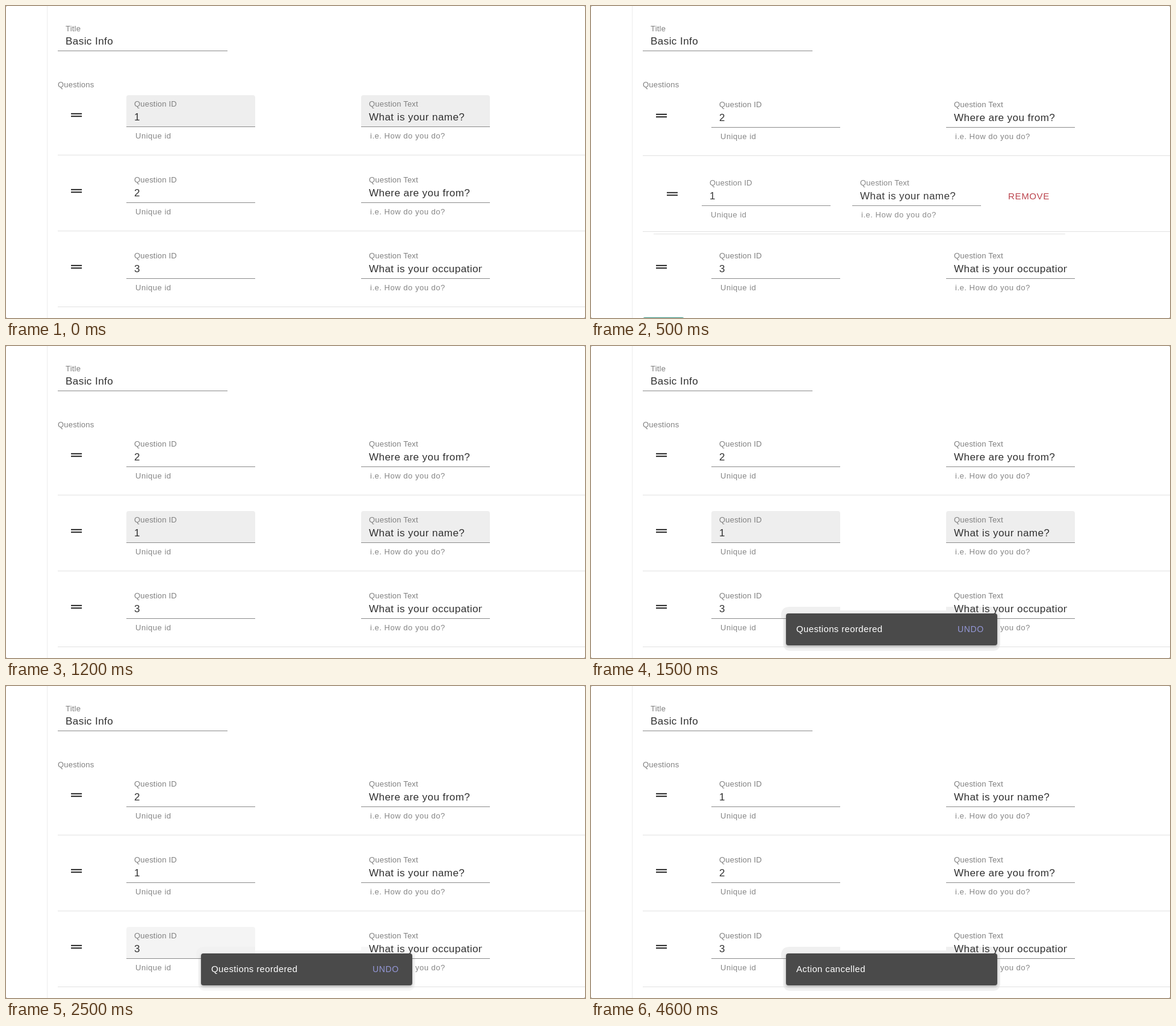
An HTML page for the animation above (4900 ms loop, 962 px wide and 518 px high).

```html
<!DOCTYPE html>
<html lang="en">
<head>
<meta charset="utf-8">
<title>Reorder questions</title>
<style>
  html, body { margin: 0; width: 100%; height: 100%; overflow: hidden; background: #8a8a8a; }
  svg { display: block; width: 962px; height: 518px; font-family: "Liberation Sans", Arial, sans-serif; }
  .label { font-size: 13px; letter-spacing: .2px; fill: #808080; }
  .value { font-size: 17px; letter-spacing: .45px; fill: #303030; }
  .hint { font-size: 13px; letter-spacing: .52px; fill: #868686; }
  .remove { font-size: 15px; letter-spacing: .65px; fill: #b83a44; }
  .note { font-size: 15px; letter-spacing: .35px; fill: #fff; }
  .undo { font-size: 14px; letter-spacing: .65px; fill: #9497d6; }
  .bar { fill: #383838; }
  .under { fill: #8c8c8c; }
  .divider { fill: #e2e2e2; }
  .snack { fill: #4a4a4a; filter: drop-shadow(0 2px 2px rgba(0, 0, 0, .28)); }
</style>
</head>
<body>
<svg id="stage" viewBox="0 0 962 518"></svg>
<script>
const LOOP = 4900, TICK = 100, PITCH = 126;
const stage = document.getElementById('stage');

function add(parent, tag, attrs = {}, text = '') {
  const el = document.createElementNS('http://www.w3.org/2000/svg', tag);
  for (const key in attrs) el.setAttribute(key, attrs[key]);
  el.textContent = text;
  parent.appendChild(el);
  return el;
}
const rect = (p, x, y, width, height, attrs) => add(p, 'rect', { x, y, width, height, ...attrs });
const text = (p, x, y, cls, str) => add(p, 'text', { x, y, class: cls }, str);
const show = (el, on) => el.setAttribute('opacity', Number(on));
const move = (el, x, y) => el.setAttribute('transform', `translate(${x} ${y})`);

function field(p, x, label, value, hint) {
  const fill = add(p, 'path', { d: `M${x} 200V152q0-4 4-4h206q4 0 4 4v48z`, fill: '#eee' });
  rect(p, x, 200, 214, 1, { class: 'under' });
  text(p, x + 13, 167, 'label', label);
  const box = add(p, 'svg', { x: x + 13, y: 170, width: 188, height: 28 });
  text(box, 0, 20, 'value', value);
  text(p, x + 15, 220, 'hint', hint);
  return fill;
}

function row(id, question, idX, textX, lineWidth) {
  const g = add(stage, 'g');
  const body = add(g, 'g');
  for (const y of [177.8, 182]) rect(body, 108, y, 18, 2.2, { class: 'bar' });
  const fills = [
    field(body, idX, 'Question ID', id, 'Unique id'),
    field(body, textX, 'Question Text', question, 'i.e. How do you do?')
  ];
  const line = rect(g, 86, 247, lineWidth, 1, { class: 'divider' });
  return { g, body, fills, line };
}

// Page frame and title
rect(stage, 0, 0, 962, 518, { rx: 2, fill: '#fff' });
rect(stage, 68, 0, 1, 518, { fill: '#ececec' });
text(stage, 99, 42, 'label', 'Title');
text(stage, 99, 64, 'value', 'Basic Info');
rect(stage, 86, 74, 282, 1, { class: 'under' });
text(stage, 86, 135, 'label', 'Questions');
const button = rect(stage, 86, 516.7, 69, 36, { rx: 4, fill: '#4f9f8f' });

// Soft halo around the snackbar
const halo = add(stage, 'g', { fill: '#f0f0f0' });
rect(halo, 319, 439, 361, 67, { rx: 11 });
add(halo, 'path', { d: 'M316 452V444q2-11 14-11h84v19z' });
rect(halo, 590, 433, 90, 19);

const name = 'What is your name?';
const rows = [
  row('1', name, 200, 590, 876),
  row('2', 'Where are you from?', 200, 590, 876),
  row('3', 'What is your occupation?', 200, 590, 876)
];
const ghost = row('1', name, 166, 416, 684);
ghost.fills.forEach(f => show(f, false));
text(ghost.body, 675, 190, 'remove', 'REMOVE');

// Snackbar
const bar = add(stage, 'g');
rect(bar, 324, 444, 351, 53, { rx: 4, class: 'snack' });
const press = rect(bar, 596, 452, 71, 36, { rx: 4, fill: '#9497d6', 'fill-opacity': .13 });
const note = text(bar, 341, 475, 'note', '');
const undo = text(bar, 609, 475, 'undo', 'UNDO');

// time, ghost x, ghost y, progress of the swap
const drag = [
  [100, 0, 1, 0], [200, 4, 24, 0], [300, 10, 68, .1], [400, 15, 110, .8],
  [500, 18, 131, 1], [600, 19, 133, 1], [700, 18, 132, 1], [800, 13, 130, 1],
  [900, 4, 127, 1], [1000, 0, 126, 1]
];

// time, hovered row, opacity of each field fill
const hover = [
  [0, 0, 1, 1], [100, -1, 0, 0], [900, 2, 1, 1], [1200, 1, 1, 1],
  [2200, 1, .5, .5], [2300, 2, .6, .6], [2400, 2, 1, 1], [2500, 2, .65, 0], [2600, -1, 0, 0]
];

const at = (steps, t) => steps.filter(s => s[0] <= t).pop();

function render(t) {
  const dragging = t >= 100 && t < 1200;
  const swapped = t >= 1200 && t < 3500;
  const [, x, y, p] = dragging ? at(drag, t) : [0, 0, 0, 0];

  move(rows[0].g, 0, dragging ? p * 127 : swapped ? PITCH : 0);
  move(rows[1].g, 0, dragging ? PITCH - p * 125 : swapped ? 0 : PITCH);
  move(rows[2].g, 0, 2 * PITCH);
  move(ghost.g, x, y);
  show(rows[0].body, !dragging);
  show(rows[2].line, !dragging);
  show(button, dragging);
  show(ghost.g, dragging ? (t >= 1000 ? .86 : .95) : 0);

  const [, slot, a, b] = at(hover, t);
  const target = swapped && slot === 1 ? 0 : slot;
  rows.forEach((r, i) => {
    show(r.fills[0], i === target ? a : 0);
    show(r.fills[1], i === target ? b : 0);
  });

  const open = t >= 1300, cancelled = t >= 3400;
  show(bar, open);
  show(halo, open ? (t >= 2300 && t < 2600 ? .5 : 1) : 0);
  show(press, t >= 3200 && !cancelled);
  show(undo, !cancelled);
  note.textContent = cancelled ? 'Action cancelled' : 'Questions reordered';
}

const start = performance.now();
function loop() {
  const t = (performance.now() - start) % LOOP;
  render(Math.floor(t / TICK) * TICK);
  requestAnimationFrame(loop);
}
loop();
</script>
</body>
</html>
```
